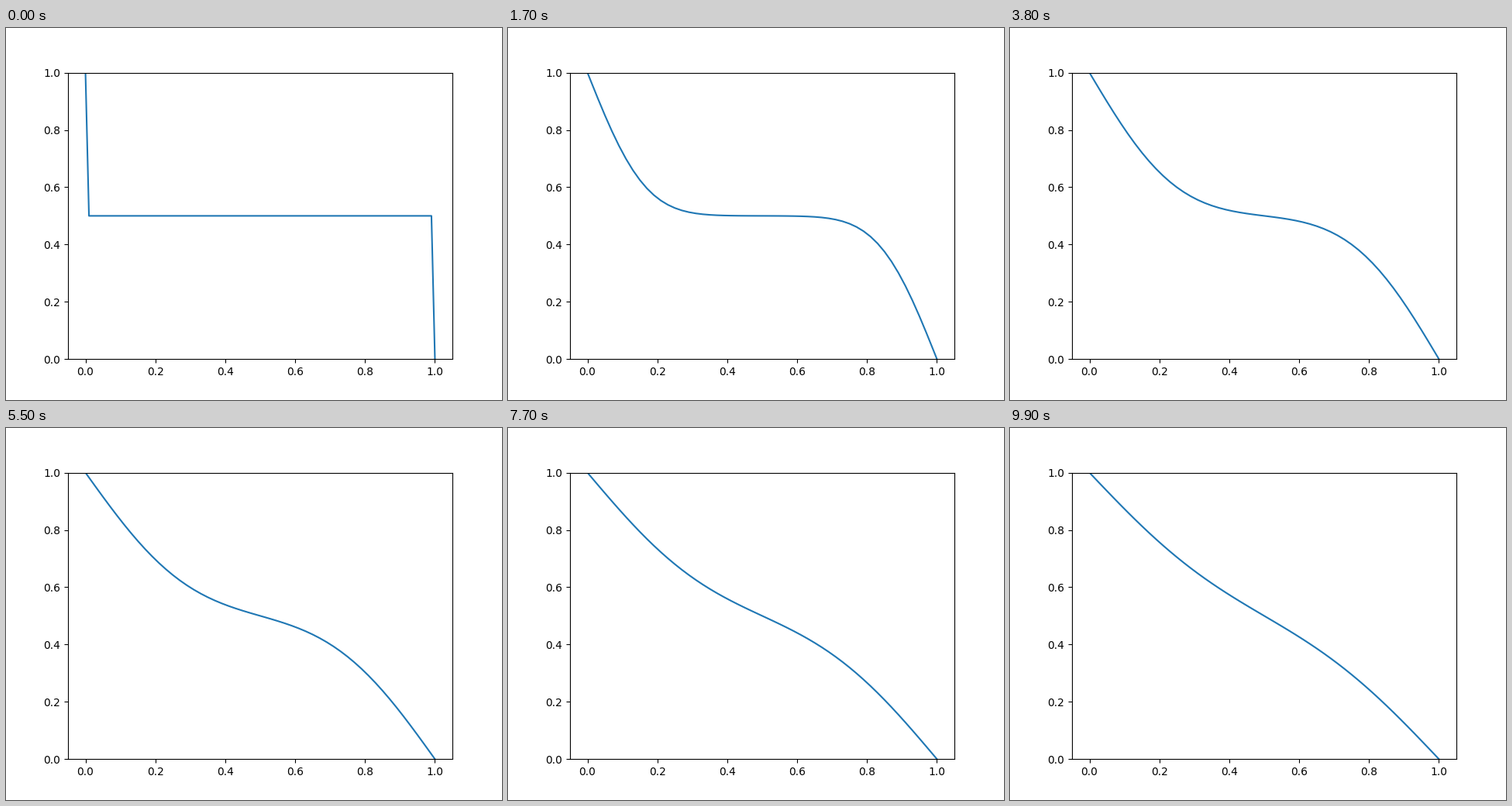
Recreate the animation shown at these times as a matplotlib script. Size 640 px wide and 480 px high, loop 10 s.

```python
import numpy as np
import matplotlib.pyplot as plt
from matplotlib.animation import FuncAnimation

CELLS = 100
FRAMES = 100
STEPS_PER_FRAME = 10
R = 0.5  # diffusion number D * dt / dx**2


def step(u):
    """Advance the heat equation once, keeping both ends fixed."""
    new = u.copy()
    new[1:-1] += R * (u[2:] - 2 * u[1:-1] + u[:-2])
    return new


def solve():
    u = np.full(CELLS + 1, 0.5)
    u[0], u[-1] = 1.0, 0.0
    states = [u]
    for _ in range(FRAMES - 1):
        for _ in range(STEPS_PER_FRAME):
            u = step(u)
        states.append(u)
    return states


x = np.linspace(0, 1, CELLS + 1)
states = solve()

fig, ax = plt.subplots(figsize=(6.4, 4.8), dpi=100)
line, = ax.plot(x, states[0])
ax.set_xlim(-0.05, 1.05)
ax.set_ylim(0, 1)


def update(frame):
    line.set_ydata(states[frame])
    return line,


anim = FuncAnimation(fig, update, frames=FRAMES, interval=100, repeat=True,
                     repeat_delay=0, blit=False)
plt.show()
```
